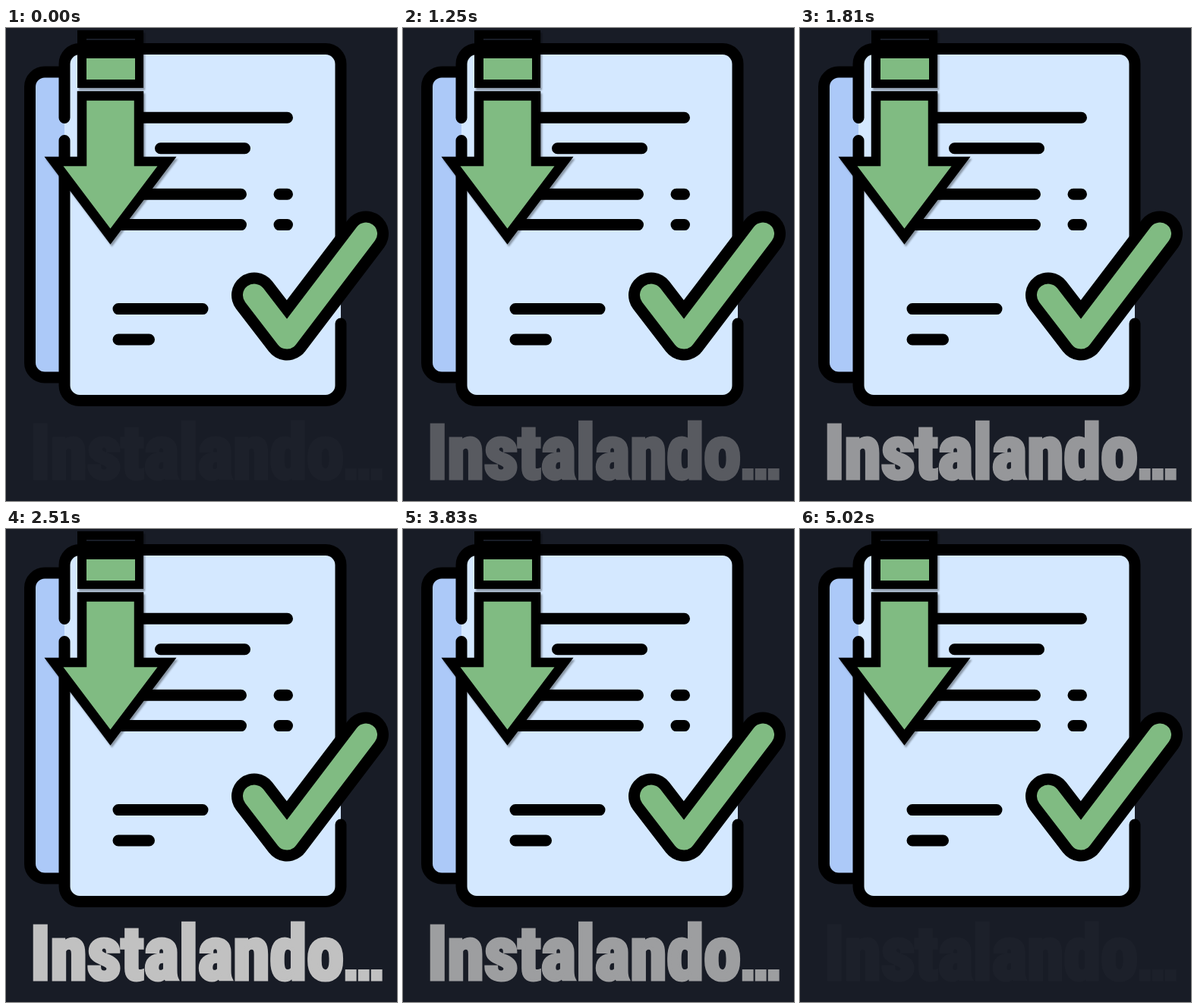
These frames come from a looping animation (515x624 px, 5500 ms). An HTML page:

```html
<!DOCTYPE html>
<html lang="es">
<head>
<meta charset="utf-8">
<title>Instalando</title>
<style>
  html, body { margin: 0; width: 100%; height: 100%; overflow: hidden; background: #181c26; }
  svg { display: block; width: 515px; height: 624px; }
  .ink { fill: none; stroke: #000; stroke-width: 15; stroke-linecap: round; stroke-linejoin: round; }
  .green { fill: #80bb82; }
  .shadow { filter: drop-shadow(2px 3px 1px rgba(0, 0, 0, .35)); }
  #label {
    font: 900 98px Impact, Anton, "Roboto Condensed", Roboto, sans-serif; font-stretch: 75%;
    fill: #c1c1c1; stroke: #c1c1c1; stroke-width: 5;
  }
  #dots { font: bold 70px "Liberation Sans", Arial, sans-serif; letter-spacing: -2.5px; }
</style>
</head>
<body>
<svg viewBox="0 0 515 624">
  <!-- back sheet -->
  <path class="ink" style="fill:#acc9f8;stroke-linecap:butt"
    d="M77 58H51A19.5 19.5 0 0 0 31.5 77.5V441.5A19.5 19.5 0 0 0 51 461H77"/>

  <!-- front sheet -->
  <rect x="77" y="27.5" width="364" height="464" rx="20" fill="#d4e8ff"/>
  <path class="ink" d="M77 118.5V47.5A20 20 0 0 1 97 27.5H421A20 20 0 0 1 441 47.5V300
    M77 148.5V471.5A20 20 0 0 0 97 491.5H421A20 20 0 0 0 441 471.5V390"/>
  <path class="ink" d="M150 118.3H370.5 M203.5 158.7H314.5 M150 219.2H309.5 M360 219.2H370.5
    M150 259.6H309.5 M360 259.6H370.5 M148 370.6H259 M148 411H188.5"/>

  <!-- check mark: a wide black stroke under a narrower green one -->
  <path id="check" class="ink" style="stroke-width:60" d="M327 352.5L370 408.5L474 271.5"/>
  <path class="ink" style="stroke:#80bb82;stroke-width:30" d="M327 352.5L370 408.5L474 271.5"/>

  <!-- arrow -->
  <g class="shadow">
    <path d="M94 3H181V79H94Z"/>
    <path d="M106 14H170V16H106Z" fill="#181c26"/>
    <path class="green" d="M106 40H170V68H106Z"/>
    <path class="green" stroke="#000" stroke-width="12.5" d="M100 89.5H175V176H212L137.5 275L63 176H100Z"/>
  </g>

  <g id="label">
    <text id="word" x="32" y="593.5">Instalando</text>
    <text id="dots" x="444.5" y="593.5">...</text>
  </g>
</svg>
<script>
const LOOP = 5500, FADE_START = 830, STEP = 174.5;
const WORD_WIDTH = 413;
const label = document.getElementById('label');
const word = document.getElementById('word');

// Track the word so that it ends just before the dots.
const gap = (WORD_WIDTH - word.getComputedTextLength()) / word.textContent.length;
word.style.letterSpacing = gap + 'px';

// Stepped fade: up over 8 steps, a plateau, down over 8 steps.
function opacityAt(time) {
  const step = Math.floor((time - FADE_START) / STEP);
  const level = (12.15 - Math.abs(step - 11.15)) / 8;
  return Math.min(1, Math.max(.025, level));
}

function draw(now) {
  label.style.opacity = opacityAt(now % LOOP);
  requestAnimationFrame(draw);
}
draw(performance.now());
</script>
</body>
</html>
```
